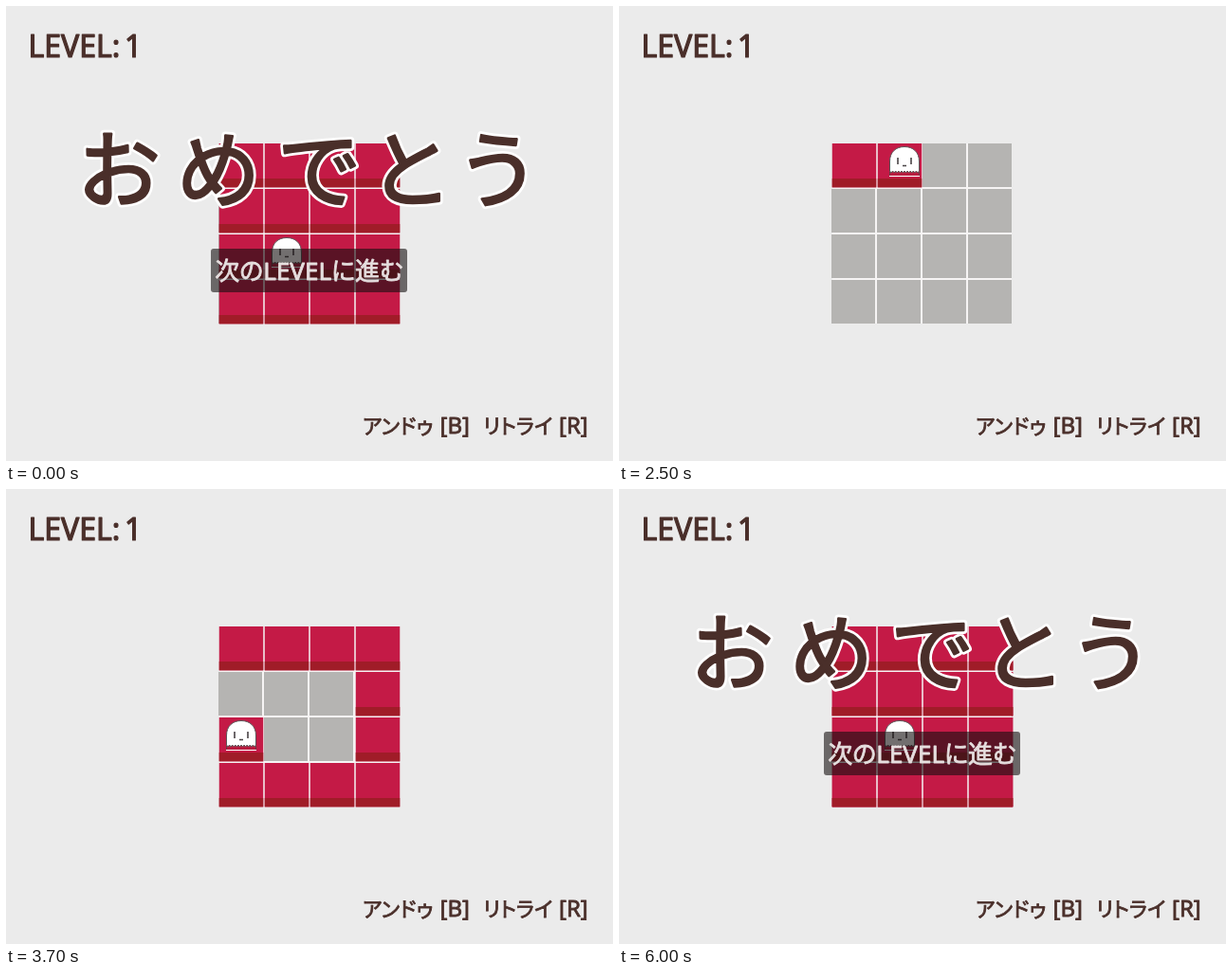
Animation, 640 px wide and 480 px high, one loop 6100 ms. Source, as an HTML page:

```html
<!DOCTYPE html>
<html lang="ja">
<meta charset="utf-8">
<style>
html, body { margin: 0; height: 100%; overflow: hidden; background: #ebebeb; }
svg { display: block; width: 640px; height: 480px; }
text {
  font: 24px "Noto Sans", "Noto Sans CJK JP", sans-serif;
  font-feature-settings: "palt";
  fill: #4a2f2a; stroke: #4a2f2a; stroke-width: .8px; stroke-linejoin: round;
}
.level { font-size: 32px; stroke-width: 1.2px; }
.kana { font-size: 22px; }
#cheer text { font-size: 88px; text-anchor: middle; stroke-width: 2.5px; }
#cheer .rim { stroke: #fff; stroke-width: 8px; }
#next text { font-size: 26px; text-anchor: middle; fill: #e6dfdf; stroke: #e6dfdf; }
</style>
<svg viewBox="0 0 640 480">
  <defs>
    <g id="ghost">
      <path d="M-16 6V11H16V6Z" fill="#b81d40"/>
      <path d="M-15.5 7V11M15.5 7V11" stroke="#6b3a44"/>
      <path d="M-16 11.5H16" stroke="#fff"/>
      <path id="body" fill="#fff" stroke="#5a5557"/>
      <path d="M-7 -8V-1M7 -8V-1M-2 .5H2" fill="none" stroke="#4a4446" stroke-width="1.6"/>
    </g>
  </defs>
  <text class="level" x="23.5" y="54">LEVEL:</text>
  <text class="level" x="125" y="54">1</text>
  <text class="kana" x="376" y="451">アンドゥ</text><text x="457.5" y="451">[B]</text>
  <text class="kana" x="503" y="451">リトライ</text><text x="583" y="451">[R]</text>
  <g id="play"></g>
  <g id="end">
    <g id="full"></g>
    <g id="cheer"></g>
    <g id="next">
      <rect x="216" y="256" width="207" height="46" rx="3" fill="#14100f" fill-opacity=".6"/>
      <text x="319.5" y="289">次のLEVELに進む</text>
    </g>
  </g>
</svg>
<script>
const $ = id => document.getElementById(id);
const LOOP = 6100, CELL = 48;
const STEP = { R: [1, 0], L: [-1, 0], D: [0, 1], U: [0, -1] };

// Cells in the order they are visited
const route = [[0, 0]];
for (const c of 'RRRDDDLLLUURRDL') {
  const [x, y] = route.at(-1), [dx, dy] = STEP[c];
  route.push([x + dx, y + dy]);
}

// [time, pixels walked along the route]
const walk = [[2500, 53], [3100, 320], [3300, 416], [3400, 432], [3500, 432],
  [3700, 480], [4200, 688], [4300, 720]];

function walked(t) {
  if (t < walk[0][0]) return 0;
  const i = walk.findIndex(k => k[0] > t);
  if (i < 0) return 720;
  const [t0, d0] = walk[i - 1], [t1, d1] = walk[i];
  return d0 + (d1 - d0) * (t - t0) / (t1 - t0);
}

const rect = (x, y, w, h, fill) =>
  `<rect x="${x}" y="${y}" width="${w}" height="${h}" fill="${fill}"/>`;

function board(d) {
  const n = Math.floor(d / CELL), part = d / CELL - n;
  const tiles = route.map(([cx, cy], i) => {
    const x = 224 + cx * CELL, y = 145 + cy * CELL;
    return i > n ? rect(x, y, 46, 46, '#b5b4b2')
      : rect(x + .75, y, 46.5, 46.3, '#c41a46') + rect(x + .75, y + 37, 46.5, 9.3, '#a01c28');
  });
  const a = route[n], b = route[n + 1] || a;
  const [gx, gy] = [0, 1].map(k => Math.round((a[k] + (b[k] - a[k]) * part) * CELL));
  return rect(225, 145, 189, 190, '#f6f4f4') + tiles.join('') +
    `<use href="#ghost" x="${248 + gx}" y="${168 + gy}"/>`;
}

const clamp = v => Math.max(0, Math.min(1, v));

$('body').setAttribute('d', 'M-15.5 6V-4C-15.5 -14 -9 -19.5 0 -19.5S15.5 -14 15.5 -4V6' +
  'l-1.55 2l-1.55 -2'.repeat(10) + 'Z');
$('full').innerHTML = board(720);
// Each letter is drawn twice: a white rim, then the dark face
$('cheer').innerHTML = [...'おめでとう'].map((c, i) => {
  const at = `x="${[119, 223, 330, 424, 518][i]}" y="205"`;
  return `<text class="rim" aria-hidden="true" ${at}>${c}</text><text ${at}>${c}</text>`;
}).join('');

function frame(now) {
  const t = Math.floor(now % LOOP / 100) * 100;
  const opening = t < 2500;
  $('play').innerHTML = board(walked(t));
  $('end').style.opacity = opening ? clamp(1 - t / 1100) : t < 4300 ? 0 : 1;
  $('cheer').style.opacity = opening ? 1 : clamp((t - 4300) / 200);
  $('next').style.opacity = opening ? 1 : clamp((t - 4500) / 500);
  requestAnimationFrame(frame);
}
requestAnimationFrame(frame);
</script>
</html>
```
